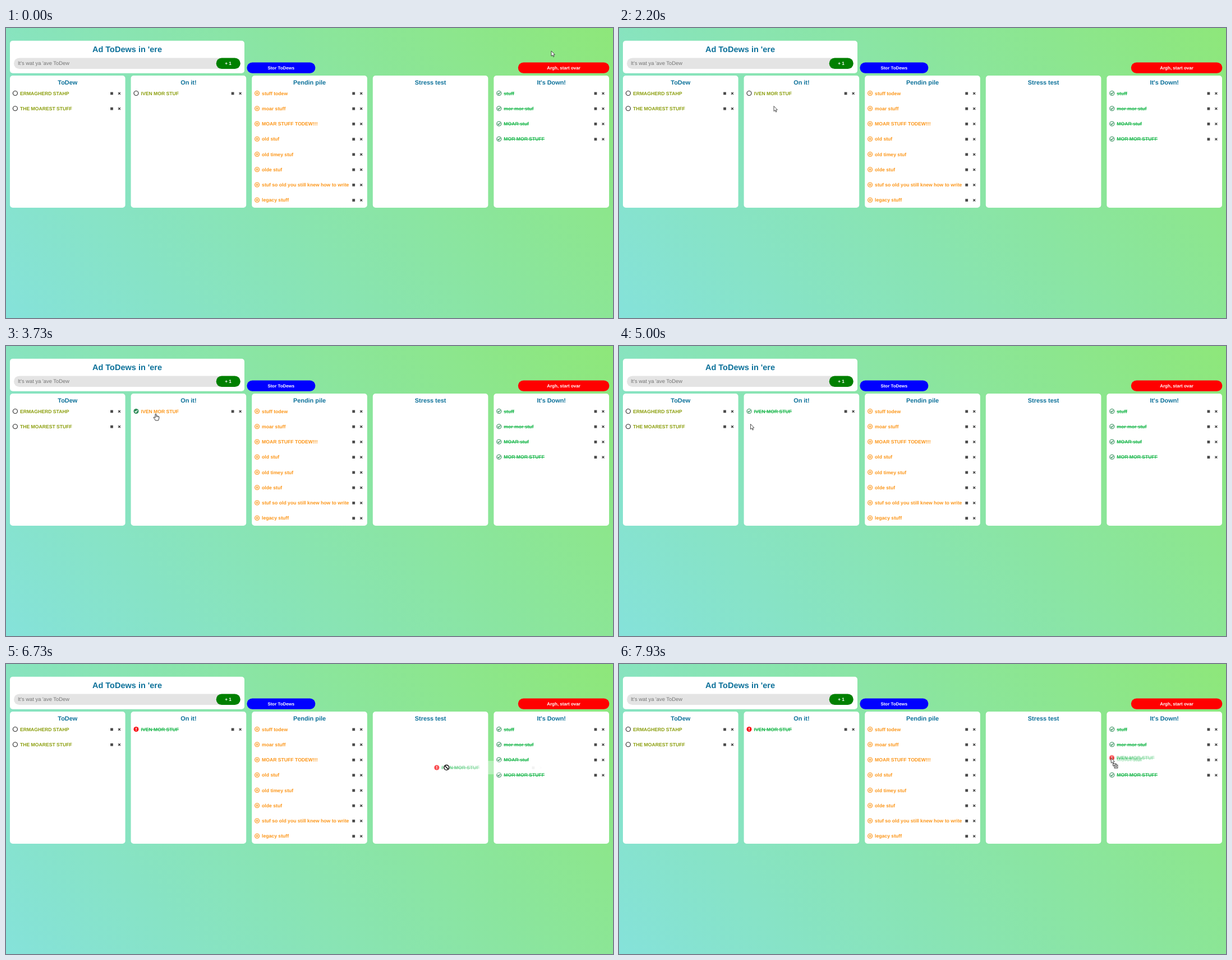
Animation of 1082 by 518 pixels, one loop 8 s. Source, as an HTML page with a canvas:

```html
<!DOCTYPE html>
<html lang="en">
<head>
<meta charset="utf-8">
<title>Todo board</title>
<style>
html, body { margin: 0; width: 100%; height: 100%; overflow: hidden; }
canvas { display: block; }
</style>
</head>
<body>
<canvas id="stage" width="1082" height="518"></canvas>
<script>
const W = 1082, H = 518, LOOP = 8000, STEP = 1000 / 15;
const FONT = '"Liberation Sans", Arial, sans-serif';
const INK = '#0b7099', OLIVE = '#8b9e0c', ORANGE = '#fc9517', GREEN = '#1fb84f', SEA = '#2e8b57';
const COL_W = 205.6, PITCH = 215.6, ROW_H = 27.25, ROW_Y = 116.5;

const columns = [
  { title: 'ToDew', kind: 'todo', items: ['ERMAGHERD STAHP', 'THE MOAREST STUFF'] },
  { title: 'On it!', kind: 'todo', items: ['IVEN MOR STUF'] },
  { title: 'Pendin pile', kind: 'pending', items: ['stuff todew', 'moar stuff', 'MOAR STUFF TODEW!!!',
    'old stuf', 'old timey stuf', 'olde stuf', 'stuf so old you still knew how to write', 'legacy stuff'] },
  { title: 'Stress test', kind: 'todo', items: [] },
  { title: "It's Down!", kind: 'done', items: ['stuff', 'mor mor stuf', 'MOAR stuf', 'MOR MOR STUFF'] }
];
const textColor = { todo: OLIVE, pending: ORANGE, done: GREEN };
const idleIcon = { todo: 'empty', pending: 'pause', done: 'check' };
const hoverIcon = { todo: 'pauseFull', pending: 'checkFull', done: 'alert' };

// Each entry: time, x, y
const pointerPath = [
  [603, 972, 41], [1000, 800, 72], [1300, 560, 132], [1470, 464, 164], [1670, 405, 184],
  [1930, 320, 172], [2130, 277, 146], [2200, 276, 139.5], [2330, 277, 131], [2530, 270, 121],
  [2800, 270, 121], [3000, 269, 136], [3330, 268, 160], [3533, 268, 160], [3667, 267, 132],
  [3730, 267, 121], [3930, 266, 120], [4267, 266, 120], [4500, 262, 150], [4700, 254, 162],
  [4870, 241, 151], [5000, 234.5, 139.5], [5070, 232, 131], [5330, 231.5, 118], [5470, 231.5, 115.5]
];
const ghostPath = [
  [5733, 232, 116.5], [5867, 244, 146], [6000, 291.5, 201], [6200, 392, 214], [6400, 560, 212],
  [6600, 711.5, 203], [6730, 767, 185], [7000, 832, 180], [7470, 882, 172], [7530, 881, 170],
  [7730, 878.5, 167.5]
];

function along(path, t) {
  if (t <= path[0][0]) return path[0].slice(1);
  for (let i = 1; i < path.length; i++) {
    const [t0, x0, y0] = path[i - 1], [t1, x1, y1] = path[i];
    if (t <= t1) {
      const k = (t - t0) / (t1 - t0);
      return [x0 + (x1 - x0) * k, y0 + (y1 - y0) * k];
    }
  }
  return path[path.length - 1].slice(1);
}

const view = document.getElementById('stage').getContext('2d');
const ghostCanvas = document.createElement('canvas');
ghostCanvas.width = 240;
ghostCanvas.height = 60;
const ghostCtx = ghostCanvas.getContext('2d');

function box(c, x, y, w, h, r, fill) {
  c.fillStyle = fill;
  c.beginPath();
  c.roundRect(x, y, w, h, r);
  c.fill();
}

function label(c, text, x, y, size, color, align = 'left', weight = 'bold') {
  c.font = `${weight} ${size}px ${FONT}`;
  c.textRendering = 'geometricPrecision';
  c.textAlign = align;
  c.fillStyle = color;
  c.fillText(text, x, y);
}

function line(c, points, color, width) {
  c.strokeStyle = color;
  c.lineWidth = width;
  c.beginPath();
  points.forEach(([x, y], i) => i ? c.lineTo(x, y) : c.moveTo(x, y));
  c.stroke();
}

function ring(c, x, y, r, color, width) {
  c.strokeStyle = color;
  c.lineWidth = width;
  c.beginPath();
  c.arc(x, y, r, 0, Math.PI * 2);
  c.stroke();
}

function disc(c, x, y, r, color) {
  c.fillStyle = color;
  c.beginPath();
  c.arc(x, y, r, 0, Math.PI * 2);
  c.fill();
}

function bars(c, x, y, color) {
  c.fillStyle = color;
  c.fillRect(x - 1.8, y - 2.1, 1.3, 4.2);
  c.fillRect(x + 0.5, y - 2.1, 1.3, 4.2);
}

function icon(c, type, x, y) {
  const tick = [[x - 2.2, y], [x - 0.6, y + 1.8], [x + 2.4, y - 1.9]];
  if (type === 'empty') ring(c, x, y, 4, '#303030', 1.2);
  if (type === 'pause') { ring(c, x, y, 4, ORANGE, 1.1); bars(c, x, y, ORANGE); }
  if (type === 'pauseFull') { disc(c, x, y, 4.5, ORANGE); bars(c, x, y, '#fff'); }
  if (type === 'check') { ring(c, x, y, 4, SEA, 1.1); line(c, tick, SEA, 1.3); }
  if (type === 'checkFull') { disc(c, x, y, 4.5, SEA); line(c, tick, '#fff', 1.4); }
  if (type === 'alert') {
    disc(c, x, y, 4.5, '#f90d12');
    c.fillStyle = '#fff';
    c.fillRect(x - 0.7, y - 2.8, 1.4, 3.4);
    c.fillRect(x - 0.7, y + 1.3, 1.4, 1.4);
  }
}

// x, y is the middle of the row's icon
function row(c, text, kind, x, y, hovered) {
  icon(c, (hovered ? hoverIcon : idleIcon)[kind], x, y);
  label(c, text, x + 8.5, y + 3.2, 8.65, textColor[kind]);
  if (kind === 'done') {
    c.fillRect(x + 8.5, y + 0.1, c.measureText(text).width, 0.95);
  }
  c.fillStyle = '#4a4a4a';
  c.fillRect(x + 169.7, y - 2, 4.8, 4.8);
  const cx = x + 185.6, cy = y + 0.3, d = 1.9;
  line(c, [[cx - d, cy - d], [cx + d, cy + d]], '#333', 1.3);
  line(c, [[cx + d, cy - d], [cx - d, cy + d]], '#333', 1.3);
}

function shape(c, points, fill, stroke, width) {
  c.beginPath();
  points.forEach(([x, y]) => c.lineTo(x, y));
  c.closePath();
  c.fillStyle = fill;
  c.fill();
  c.strokeStyle = stroke;
  c.lineWidth = width;
  c.stroke();
}

function arrow(c, x, y, scale = 1) {
  c.save();
  c.translate(x, y);
  c.scale(scale, scale);
  shape(c, [[0, 0], [0, 9.2], [2.1, 7.3], [3.6, 10.6], [5, 10], [3.6, 6.9], [6.4, 6.6]], '#fff', '#222', 0.8);
  c.restore();
}

function hand(c, x, y) {
  c.save();
  c.translate(x, y);
  c.lineJoin = 'round';
  shape(c, [[-1, 0.8], [0, 0], [1, 0.8], [1, 4], [2.6, 3.8], [4.2, 4.4], [5.6, 5], [6, 6.2],
    [5.6, 9], [4.6, 12], [-0.6, 12], [-2, 9.4], [-3.8, 7.2], [-3.4, 6], [-2.2, 6.2], [-1, 7.4]],
    '#fff', '#222', 0.9);
  line(c, [[1, 4], [1, 6.2]], '#222', 0.6);
  line(c, [[2.7, 4.2], [2.7, 6.3]], '#222', 0.6);
  line(c, [[4.3, 4.8], [4.3, 6.5]], '#222', 0.6);
  c.restore();
}

function noDrop(c, x, y) {
  ring(c, x, y, 4.4, '#fff', 2.8);
  disc(c, x, y, 4.4, '#fff');
  ring(c, x, y, 4.4, '#000', 1.4);
  line(c, [[x - 3.1, y - 3.1], [x + 3.1, y + 3.1]], '#000', 1.5);
}

function dropArrow(c, x, y) {
  arrow(c, x, y, 0.95);
  const frame = (fx, fy, w, h) => {
    c.fillStyle = '#fff';
    c.fillRect(fx, fy, w, h);
    c.strokeStyle = '#222';
    c.lineWidth = 0.9;
    c.strokeRect(fx, fy, w, h);
  };
  frame(x + 3.4, y + 9.6, 5.4, 4);
  frame(x + 5.8, y + 12, 5.8, 5.6);
  line(c, [[x + 7.2, y + 14.8], [x + 10.2, y + 14.8]], '#222', 0.9);
  line(c, [[x + 8.7, y + 13.3], [x + 8.7, y + 16.3]], '#222', 0.9);
}

function ghost(c, text, x, y) {
  const g = ghostCtx, ox = 12, oy = 30;
  g.globalCompositeOperation = 'source-over';
  g.clearRect(0, 0, 240, 60);
  g.fillStyle = '#fff';
  g.fillRect(ox - 7, oy - 12, 202, 24);
  row(g, text, 'done', ox, oy, true);
  const fade = g.createRadialGradient(ox, oy, 0, ox, oy, 190);
  fade.addColorStop(0, 'rgba(0,0,0,.78)');
  fade.addColorStop(1, 'rgba(0,0,0,0)');
  g.globalCompositeOperation = 'destination-in';
  g.fillStyle = fade;
  g.fillRect(0, 0, 240, 60);
  c.drawImage(ghostCanvas, x - ox, y - oy);
}

function background(c) {
  const a = 50 * Math.PI / 180, sx = Math.sin(a), sy = Math.cos(a);
  const half = (W * sx + H * sy) / 2;
  const g = c.createLinearGradient(W / 2 - sx * half, H / 2 + sy * half, W / 2 + sx * half, H / 2 - sy * half);
  g.addColorStop(0, '#85e2da');
  g.addColorStop(1, '#8ee77a');
  c.fillStyle = g;
  c.fillRect(0, 0, W, H);
}

function header(c) {
  box(c, 7, 22.7, 418, 58, 5, '#fff');
  label(c, "Ad ToDews in 'ere", 216, 43.2, 14.5, INK, 'center');
  box(c, 14, 53.5, 404, 19.5, 9.75, '#e4e4e4');
  label(c, "It's wat ya 'ave ToDew", 21, 66.2, 9.4, '#757575', 'left', 'normal');
  box(c, 374.7, 53.5, 43, 19.5, 9.75, '#008000');
  label(c, '+ 1', 396, 66.2, 8.2, '#fff', 'center');
  box(c, 429.4, 61.5, 122, 19.2, 9.6, '#0000ff');
  label(c, 'Stor ToDews', 490.3, 74, 7.9, '#fff', 'center');
  box(c, 912.8, 61.5, 162.6, 19.2, 9.6, '#ff0000');
  label(c, 'Argh, start ovar', 994, 74, 8, '#fff', 'center');
}

function board(c, t, px, py) {
  columns.forEach((col, i) => {
    const left = 7 + i * PITCH;
    box(c, left, 85, COL_W, 236, 5, '#fff');
    label(c, col.title, left + COL_W / 2, 100.7, 10.9, INK, 'center');
    col.items.forEach((text, r) => {
      const y = ROW_Y + r * ROW_H;
      let kind = col.kind;
      if (i === 1) kind = t < 2860 ? 'todo' : t < 4260 ? 'pending' : 'done';
      const hovered = overRow(i, r, px, py);
      if (hovered && kind === 'todo') box(c, left + 1.8, y - 12.4, 202, 24.8, 3, '#f4f4f4');
      row(c, text, kind, left + 9.4, y, hovered);
    });
  });
}

function overRow(i, r, x, y) {
  const left = 7 + i * PITCH;
  return x > left + 1.8 && x < left + 203.8 && Math.abs(y - ROW_Y - r * ROW_H) < 12.4;
}

function draw(t) {
  const c = view, [px, py] = along(pointerPath, t);
  background(c);
  header(c);
  board(c, t, px, py);

  if (t > 5790) {
    const [gx, gy] = along(ghostPath, t);
    ghost(c, columns[1].items[0], gx, gy);
    if (t > 7920) {
      dropArrow(c, 877.3, 168.3);
    } else {
      // The pointer leads the dragged row and closes in as it slows
      const lead = Math.min(1, (t - 5733) / 267) * (t < 6730 ? 1 : Math.max(0, 1 - (t - 6730) / 900));
      const drop = t < 6600 ? 8.5 : Math.max(0, 8.5 * (1 - (t - 6600) / 130));
      noDrop(c, gx + 3 + 14.5 * lead, gy + drop);
    }
    return;
  }
  const hovering = columns.some((col, i) => col.items.some((_, r) => overRow(i, r, px, py)));
  (hovering ? hand : arrow)(c, px, py);
}

const start = performance.now();
function tick() {
  const t = (performance.now() - start) % LOOP;
  draw(Math.floor(t / STEP + 0.1) * STEP % LOOP);
  requestAnimationFrame(tick);
}
tick();
</script>
</body>
</html>
```
